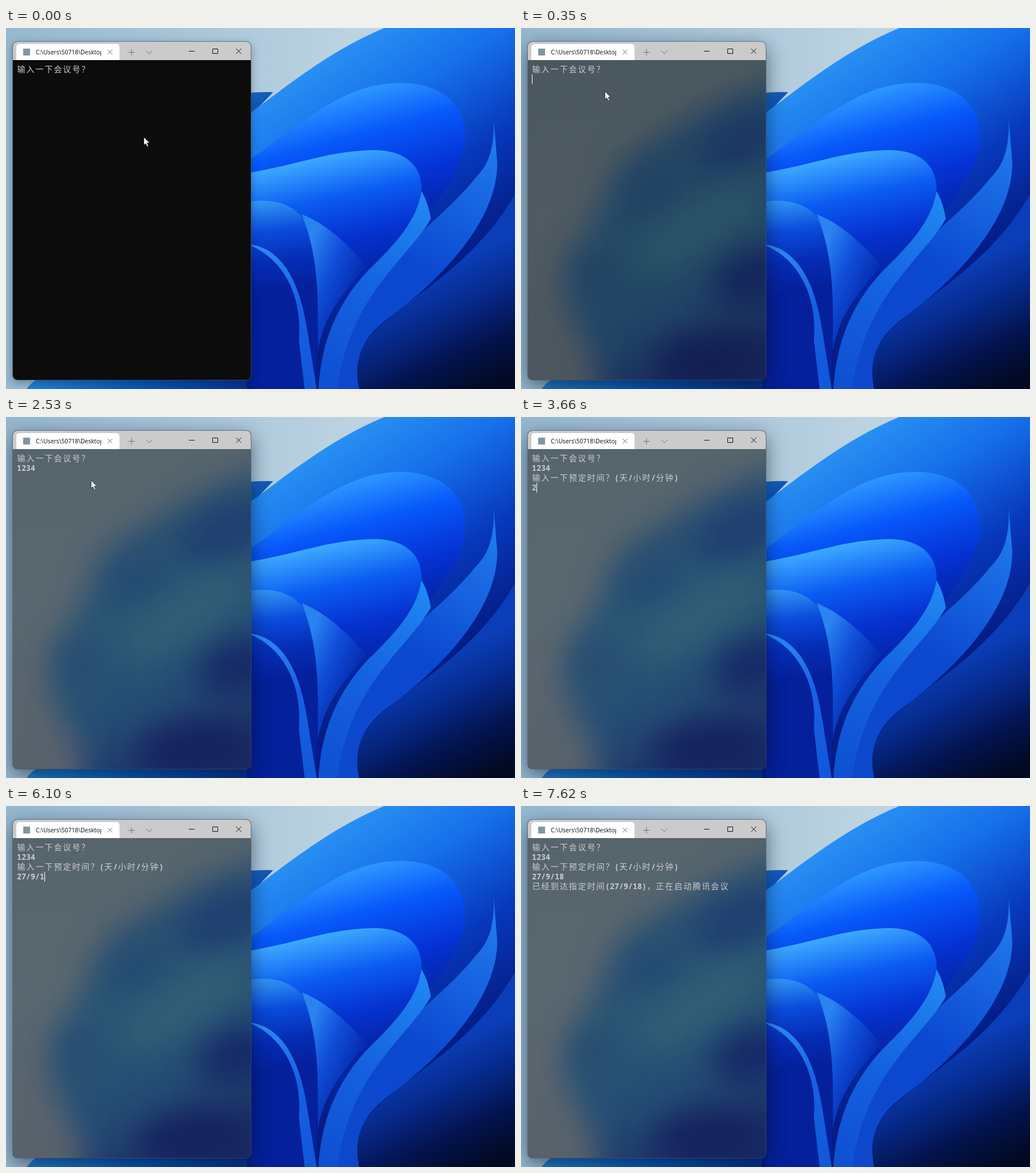
Write an HTML page with a canvas that moves like this. It is 888 by 630 pixels and loops after 8 s.

```html
<!DOCTYPE html>
<html lang="zh">
<head>
<meta charset="utf-8">
<title>Terminal</title>
<style>
  html, body { margin: 0; width: 100%; height: 100%; overflow: hidden; background: #a5c4d8; }
  canvas { display: block; width: 888px; height: 630px; }
</style>
</head>
<body>
<canvas id="stage" width="888" height="630"></canvas>
<script>
const W = 888, H = 630, LOOP = 8000;
const WIN = { x: 12, y: 24, w: 415, h: 590, r: 8 };
const BAR_BOTTOM = 56, CELL = 8, ROW = 17, LEFT = 19, TOP = 63;
const stage = document.getElementById("stage").getContext("2d");

// Each step changes part of the state; `type` appends to the terminal text.
const STEPS = [
  [0, { type: "输入一下会议号？\n", caret: false, focus: false, acrylic: 0, mouse: [240, 190], ring: false }],
  [70, { mouse: [222, 174] }],
  [130, { mouse: [176, 134] }],
  [190, { mouse: [146, 110], focus: true, caret: true, ring: true }],
  [260, { acrylic: 0.1 }],
  [350, { acrylic: 0.87, ring: false }],
  [420, { acrylic: 1 }],
  [680, { caret: false }],
  [750, { type: "1", caret: true, mouse: null }],
  [1340, { type: "2" }],
  [1600, { type: "3" }],
  [1930, { type: "4" }],
  [2000, { mouse: [147, 110] }],
  [2130, { mouse: [148, 110] }],
  [2530, { caret: false }],
  [3060, { type: "\n输入一下预定时间？(天/小时/分钟)\n", caret: true, mouse: null }],
  [3260, { mouse: [148, 110] }],
  [3660, { type: "2", mouse: null }],
  [4190, { type: "7" }],
  [4520, { type: "/" }],
  [5110, { caret: false }],
  [5240, { type: "9", caret: true }],
  [5570, { type: "/" }],
  [6100, { type: "1" }],
  [6630, { type: "8" }],
  [6960, { type: "\n" }],
  [7030, { type: "已经到达指定时间(27/9/18)，正在启动腾讯会议\n" }],
  [7620, { caret: false }]
];

function stateAt(time) {
  const state = { text: "" };
  for (const [start, change] of STEPS) {
    if (start > time) break;
    Object.assign(state, change);
    state.text += change.type || "";
  }
  return state;
}

function layer(paint) {
  const canvas = document.createElement("canvas");
  canvas.width = W;
  canvas.height = H;
  paint(canvas.getContext("2d"));
  return canvas;
}

function gradient(c, [x0, y0, x1, y1], colors) {
  const g = c.createLinearGradient(x0, y0, x1, y1);
  colors.forEach((color, i) => g.addColorStop(i / (colors.length - 1), color));
  return g;
}

function shape(c, path, line, ...colors) {
  c.fillStyle = gradient(c, line, colors);
  c.fill(new Path2D(path));
}

function windowOutline(c, grow = 0) {
  c.beginPath();
  c.roundRect(WIN.x - grow, WIN.y - grow, WIN.w + 2 * grow, WIN.h + 2 * grow, WIN.r);
}

function stroke(c, path, color, width = 1) {
  c.strokeStyle = color;
  c.lineWidth = width;
  c.stroke(new Path2D(path));
}

function paintDesktop(c) {
  c.fillStyle = gradient(c, [0, 0, 600, 0], ["#96b9d0", "#a6c5d9", "#bcd3e1"]);
  c.fillRect(0, 0, W, H);
  shape(c, "M36 630 Q48 612 80 600 H450 V630Z", [36, 0, 430, 0], "#2381cf", "#0757b8", "#06328f");
  shape(c, "M400 116 Q435 111 466 112 L420 160Z", [400, 110, 440, 150], "#2478c8", "#0a51b5");
  // wallpaper in a few broad tones
  shape(c, "M420 153 C490 102 560 42 660 0 H888 V630 H420Z",
    [560, 20, 800, 400], "#2c96f4", "#1670ea", "#0738bc", "#041c84");
  shape(c, "M428 228 C520 165 590 93 694 96 C760 98 800 132 801 190 C799 270 700 370 620 440 H428Z",
    [620, 96, 690, 350], "#32a0ff", "#0758fa", "#0432d4", "#0422a0");
  shape(c, "M851 160 C852 220 838 242 817 264 C765 330 650 410 604 480 C570 530 560 580 562 630 H620 C606 570 625 540 662 510 C760 440 858 335 857 235Z",
    [830, 200, 590, 620], "#1f78ec", "#0b48d0", "#0d48cc");
  shape(c, "M428 252 C510 238 565 214 643 213 C705 214 728 248 725 288 C720 350 660 400 600 458 L540 520 H428Z",
    [580, 220, 625, 430], "#3ca8ff", "#0b5cf2", "#0532d0", "#0524a4");
  shape(c, "M725 285 C737 305 741 330 741 333 C700 405 600 465 578 630 H545 C550 550 575 485 630 425 C685 372 716 335 725 285Z",
    [735, 300, 550, 620], "#2088f2", "#1462e0", "#0f50d2");
  shape(c, "M428 303 C472 297 506 310 523 340 C542 380 545 430 544 520 L540 630 H428Z",
    [465, 300, 485, 460], "#3296f4", "#0a4cdc", "#052cb4", "#04209a");
  shape(c, "M516 325 C562 343 607 387 628 416 C585 465 553 505 544 565 C545 470 546 400 516 325Z",
    [520, 400, 610, 440], "#2a84f0", "#104fda", "#0630b4");
  shape(c, "M428 378 C480 386 513 440 526 530 L542 630 H521 L511 545 C517 475 490 408 428 380Z",
    [440, 380, 520, 610], "#2c8cf2", "#1660e2", "#1258da");
  shape(c, "M888 290 C825 400 730 455 670 505 C622 542 605 575 616 630 H888Z",
    [735, 430, 830, 630], "#0a3eb8", "#062a8c", "#031450", "#020922");
}

function paintAcrylic(c) {
  c.fillStyle = gradient(c, [0, 56, 0, 614], ["#56656d", "#5a6770", "#59626c"]);
  c.fillRect(0, 0, W, H);
  c.filter = "blur(26px)";
  shape(c, "M500 75 C350 118 265 172 175 232 C145 300 115 350 88 400 C62 455 88 520 126 570 L142 690 H520Z",
    [200, 210, 390, 600], "#294d70", "#2b5875", "#244c74", "#1a2b65");
  const blob = (x, y, rx, ry, tilt, color) => {
    c.fillStyle = color;
    c.beginPath();
    c.ellipse(x, y, rx, ry, tilt, 0, Math.PI * 2);
    c.fill();
  };
  blob(385, 200, 85, 42, -0.45, "#1e3e71");
  blob(230, 290, 55, 36, -0.35, "#244b73");
  blob(310, 350, 125, 40, -0.55, "#315f75");
  blob(130, 430, 36, 46, 0, "#284b70");
  blob(405, 435, 72, 46, -0.35, "#152967");
  blob(330, 580, 100, 48, -0.1, "#15225f");
  c.filter = "none";
}

function paintShadow(c, focused) {
  c.shadowColor = focused ? "rgba(0,10,30,.55)" : "rgba(0,10,30,.35)";
  c.shadowBlur = focused ? 34 : 16;
  c.shadowOffsetY = focused ? 10 : 4;
  c.fillStyle = "#0c0c0c";
  windowOutline(c);
  c.fill();
  c.shadowColor = "transparent";
}

function paintTitleBar(c) {
  c.fillStyle = "#cbcbcb";
  c.fillRect(WIN.x, WIN.y, WIN.w, BAR_BOTTOM - WIN.y);
  c.fillStyle = "#fff";
  c.beginPath();
  c.roundRect(18, 28, 180, 28, [5, 5, 0, 0]);
  c.fill();
  c.fillStyle = "#8296a1";
  c.fillRect(30, 36, 12, 12);

  c.save();
  c.beginPath();
  c.rect(50, 30, 116, 24);
  c.clip();
  c.fillStyle = "#00101c";
  c.font = '10.4px "Open Sans", sans-serif';
  c.fillText("C:\\Users\\50718\\Desktop", 52, 46);
  c.restore();

  stroke(c, "M177.5 38 l8 8 m0 -8 l-8 8", "#53707e");
  stroke(c, "M213.5 42.5 h11 m-5.5 -5.5 v11", "#5f747e");
  stroke(c, "M244.5 39.5 l5.5 5.5 l5.5 -5.5", "#5f747e");
  stroke(c, "M319 40.5 h10 M360.5 36.5 h9 v8 h-9z M401.5 36 l9 9 m0 -9 l-9 9", "#111");
}

function drawText(c, text, caret) {
  let x = LEFT, y = TOP;
  c.fillStyle = "#ccc";
  for (const ch of text) {
    if (ch === "\n") {
      x = LEFT;
      y += ROW;
      continue;
    }
    const wide = ch.charCodeAt(0) > 0x2000;
    c.font = wide ? '14px "Noto Sans CJK SC", sans-serif'
                  : '600 13.3px "Noto Sans Mono", monospace';
    c.fillText(ch, x + (wide ? 0.5 : 0), y + 14);
    x += wide ? CELL * 2 : CELL;
  }
  if (caret) {
    c.fillStyle = "#fff";
    c.fillRect(x, y + 1, 1, ROW);
  }
}

function drawMouse(c, [x, y], ring) {
  if (ring) {
    c.fillStyle = "rgba(255,255,50,.48)";
    c.beginPath();
    c.arc(x, y, 11, 0, Math.PI * 2);
    c.fill();
  }
  c.save();
  c.translate(x + 0.5, y + 0.5);
  const arrow = "M0 0 V14 L3.2 11.2 L5.7 16.5 L8 15.4 L5.6 10.3 H10Z";
  c.fillStyle = "#fff";
  c.fill(new Path2D(arrow));
  stroke(c, arrow, "#16202c", 0.8);
  c.restore();
}

const desktop = layer(paintDesktop);
const acrylic = layer(paintAcrylic);
const backdrops = [false, true].map(focused => layer(c => {
  c.drawImage(desktop, 0, 0);
  paintShadow(c, focused);
}));

function draw(time) {
  const s = stateAt(time), c = stage;
  c.drawImage(backdrops[+s.focus], 0, 0);
  c.save();
  windowOutline(c);
  c.clip();
  c.globalAlpha = s.acrylic;
  c.drawImage(acrylic, 0, 0);
  c.globalAlpha = 1;
  paintTitleBar(c);
  c.restore();
  windowOutline(c, 0.5);
  c.strokeStyle = "rgba(75,85,95,.65)";
  c.lineWidth = 1;
  c.stroke();
  drawText(c, s.text, s.caret);
  if (s.mouse) drawMouse(c, s.mouse, s.ring);
}

const begin = performance.now();
function tick() {
  draw((performance.now() - begin) % LOOP);
  requestAnimationFrame(tick);
}
tick();
</script>
</body>
</html>
```
